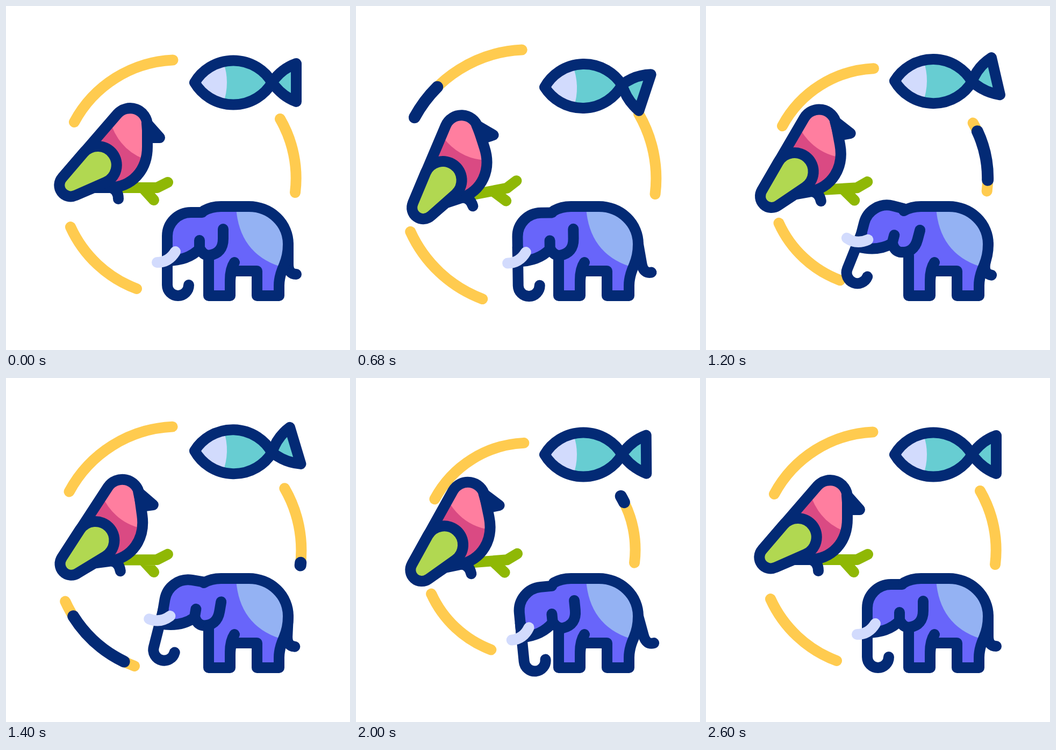
Animation of 640 by 640 pixels, one loop 2840 ms. Source, as an HTML page:

```html
<!DOCTYPE html>
<html>
<head>
<meta charset="utf-8">
<title>Wildlife cycle</title>
<style>
html, body { margin: 0; height: 100%; overflow: hidden; background: #fff; }
svg { display: block; width: 100%; height: 100%; }
.line { fill: none; stroke: #032a75; stroke-width: 20; stroke-linecap: round; stroke-linejoin: round; }
.yellow { stroke: #ffcb4f; stroke-width: calc(20px / var(--scale)); }
.glow { stroke-width: calc(22px / var(--scale)); }
.branch { stroke: #8fb805; }
.tusk { stroke: #d2dbfd; }
</style>
</head>
<body>
<svg viewBox="0 0 640 640">
  <g id="ring"></g>

  <g id="branch">
    <path class="line branch" d="M216 338H281L301 328M256 340L275 361"/>
    <g id="bird">
      <path fill="#da4a83" d="M105 319L207 201A32 32 0 0 1 263 222V262C263 305 235 338 190 338H163L129 352Z"/>
      <path fill="#ff7e9f" d="M193 213Q210 268 260 286L263 262V222A32 32 0 0 0 207 201Z"/>
      <path class="line" d="M105 319L207 201A32 32 0 0 1 263 222V262C263 305 235 338 190 338H163L129 352"/>
      <path class="line" style="fill:#032a75" d="M262 218L286 245H264Z"/>
      <path class="line" d="M195 338Q209 342 209 359"/>
      <path class="line" style="fill:#b1d851" d="M105 319A21 21 0 0 0 129.4 352.3L185 328A35 35 0 1 0 144.4 273Z"/>
    </g>
  </g>

  <g id="fish">
    <path id="fin" class="line" style="fill:#67cdd2" d="M495 142Q512 117 540 107V178Q512 167 495 142Z"/>
    <path fill="#67cdd2" d="M351 142.5A83.7 83.7 0 0 1 495 142.5A83.7 83.7 0 0 1 351 142.5Z"/>
    <path fill="#d2dbfd" d="M351 142.5A83.7 83.7 0 0 1 404 103Q418 142 404 182A83.7 83.7 0 0 1 351 142.5Z"/>
    <path class="line" d="M351 142.5A83.7 83.7 0 0 1 495 142.5A83.7 83.7 0 0 1 351 142.5Z"/>
  </g>

  <g id="elephant">
    <path id="tail" class="line" d="M525 443V480Q525 499 540 499"/>
    <path fill="#6865fa" d="M377 462V539H417V515Q417 500 421 493H467V539H508V520Q508 503 517 483Q525 465 525 443A73 70 0 0 0 452 373H400Q382 373 370 382V460Z"/>
    <path fill="#94b2f3" d="M428 375Q434 462 514 486Q525 465 525 443A73 70 0 0 0 452 373Z"/>
    <g id="head">
      <path fill="#6865fa" d="M372 384H344A44 44 0 0 0 300 428V474Q338 474 360 452L378 464Q404 460 404 433V415Z"/>
      <path id="trunk" class="line" d="M300 447V519A20 20 0 0 0 340 519"/>
      <path class="line" d="M365 384H344A44 44 0 0 0 300 428V474Q338 474 360 452M360 436V450Q366 464 378 464Q404 460 404 433V415"/>
    </g>
    <path class="line" d="M377 464V539H417V515Q417 500 421 493H467V539H508V520Q508 503 517 483Q525 465 525 443A73 70 0 0 0 452 373H400Q382 373 368 381M417 510Q417 489 425 477"/>
    <g id="jaw"><path id="tusk" class="line tusk" d="M281 477Q303 477 315 457"/></g>
  </g>
</svg>
<script>
const LOOP = 2840, END = 2600;
const $ = id => document.getElementById(id);
const clamp = x => Math.max(0, Math.min(1, x));

// Cosine ease from 0 to 1 between two times.
const ease = (t, from, to) => (1 - Math.cos(Math.PI * clamp((t - from) / (to - from)))) / 2;

// Sways between a and b in equal half periods; fades in before `from` and out after `to`.
function sway(t, [start, from, to, end], halves, a, b) {
  const fade = ease(t, start, from) * (1 - ease(t, to, end));
  const phase = Math.PI * halves * clamp((t - from) / (to - from));
  return fade * (a + (b - a) * (1 - Math.cos(phase)) / 2);
}

function addArc(d, kind) {
  const path = document.createElementNS("http://www.w3.org/2000/svg", "path");
  path.setAttribute("d", d);
  path.setAttribute("class", "line " + kind);
  path.setAttribute("pathLength", 1);
  $("ring").append(path);
  return path;
}
const arcs = ["M243 526A220 220 0 0 1 120 411", "M127 216A220 220 0 0 1 310.5 100.5", "M510 210A220 220 0 0 1 538 347"];
arcs.forEach(d => addArc(d, "yellow"));
const glows = arcs.map(d => addArc(d, "glow"));

// A dark stretch runs through the three arcs in turn, twice per loop.
function drawGlow(path, i, t) {
  const begin = 225 + 387 * i, pass = 978;
  const local = t - begin - (t >= begin + pass ? pass : 0);
  const front = clamp(local / 240), rear = clamp((local - 170) / 240);
  path.style.display = front > rear ? "" : "none";
  path.setAttribute("stroke-dasharray", `${front - rear} 2`);
  path.setAttribute("stroke-dashoffset", -rear);
}

const turn = (id, angle, x, y, shift = "") =>
  $(id).setAttribute("transform", `${shift}rotate(${angle} ${x} ${y})`);

function drawRing(t) {
  const scale = 1 + sway(t, [200, 610, 2045, END], 3, .1, -.1);
  $("ring").style.setProperty("--scale", scale);
  $("ring").setAttribute("transform", `translate(330 313) scale(${scale}) translate(-330 -313)`);
  glows.forEach((path, i) => drawGlow(path, i, t));
}

function drawBird(t) {
  const bend = sway(t, [200, 700, 2300, END], 2, -11, 0) * (1 - ease(t, 1500, END));
  turn("branch", bend, 285, 340);
  turn("bird", sway(t, [200, 700, 1950, END], 1, -7, -7.5), 209, 330);
}

function drawFish(t) {
  const rise = sway(t, [80, 700, 1460, 2000], 1, 6.5, -5.5);
  turn("fish", -.25 * rise, 423, 142, `translate(0 ${rise})`);
  turn("fin", sway(t, [80, 700, 1340, 2080], 1, 18.3, -17) + .25 * rise, 495, 142);
}

function drawElephant(t) {
  const beat = [0, 440, 1880, END];
  const nod = sway(t, beat, 2, -6, 14.7), lift = Math.max(0, nod);
  turn("head", nod, 393.6, 393);
  turn("jaw", nod, 393.6, 393);
  turn("trunk", .5 * lift, 300, 450);
  turn("tusk", 1.4 * lift, 316, 456);
  turn("tail", sway(t, beat, 2, -16.4, 9.2), 525, 443);
}

const origin = performance.now();
function tick() {
  const t = Math.min((performance.now() - origin) % LOOP, END);
  for (const draw of [drawRing, drawBird, drawFish, drawElephant]) draw(t);
  requestAnimationFrame(tick);
}
tick();
</script>
</body>
</html>
```
